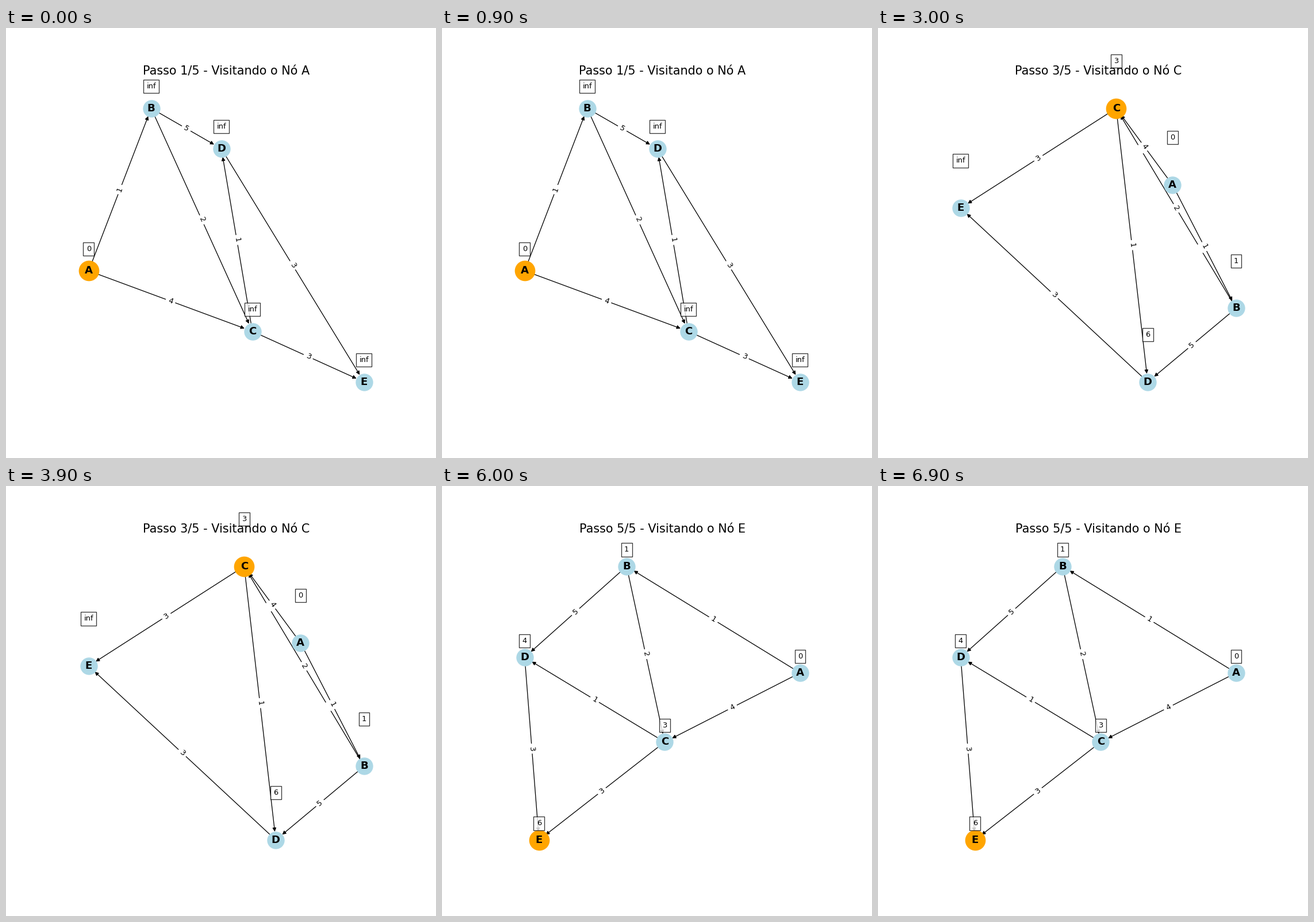
Recreate the animation shown at these times as a matplotlib script. Size 748x748 px, loop 7500 ms.

```python
import math

import matplotlib.pyplot as plt
from matplotlib.animation import FuncAnimation
from matplotlib.patches import FancyArrowPatch

NODE, ACTIVE = 500, 700
MARGIN = 0.105  # free space on each side, as a share of the drawing
LIFT = 0.1j     # a distance box sits this far above its node

NAMES = "ABCDE"
EDGES = [(a, b, int(w)) for a, b, w in "AB1 AC4 BC2 BD5 CD1 CE3 DE3".split()]

# Key points A to D of each step, x + yj; E balances them around the origin
LAYOUTS = [
    (-0.854 - 0.103j, -0.433 + 0.638j, 0.248 - 0.379j, 0.039 + 0.454j),
    (0.405 - 0.621j, 0.621 + 0.168j, -0.059 - 0.243j, 0.033 + 0.363j),
    (0.276 + 0.113j, 0.658 - 0.148j, -0.063 + 0.275j, 0.127 - 0.304j),
    (0.726 - 0.863j, -0.922 - 0.553j, 0.765 + 0.166j, -1.0 + 0.394j),
    (1.0 + 0.138j, -0.026 + 0.782j, 0.199 - 0.280j, -0.629 + 0.232j),
]


def dijkstra(start):
    """Return (visited node, distances at that moment) for each step."""
    dist = {n: math.inf for n in NAMES}
    dist[start] = 0
    left, steps = list(NAMES), []
    while left:
        node = min(left, key=dist.get)
        left.remove(node)
        steps.append((node, dict(dist)))
        for a, b, w in EDGES:
            if a == node:
                dist[b] = min(dist[b], dist[a] + w)
    return steps


STEPS = dijkstra("A")

plt.rcParams["font.family"] = "DejaVu Sans"
fig = plt.figure(figsize=(8, 8), dpi=93.5, facecolor="white")
ax = fig.add_subplot()


def padded(values):
    lo, hi = min(values), max(values)
    pad = MARGIN * (hi - lo)
    return lo - pad, hi + pad


def put_text(p, text, **style):
    ax.text(p.real, p.imag, str(text), ha="center", va="center", **style)


def draw_nodes(points, size, color):
    ax.scatter([p.real for p in points], [p.imag for p in points],
               s=size, c=color, zorder=2)


def draw_arrow(p, q):
    gap = math.sqrt(NODE) / 2
    ax.add_patch(FancyArrowPatch(
        (p.real, p.imag), (q.real, q.imag), arrowstyle="-|>", mutation_scale=10,
        color="black", lw=1, shrinkA=gap, shrinkB=gap, zorder=1))


def draw_weight(p, q, weight):
    (x0, y0), (x1, y1) = ax.transData.transform([(p.real, p.imag), (q.real, q.imag)])
    angle = math.degrees(math.atan2(y1 - y0, x1 - x0))
    upright = (angle + 90) % 180 - 90
    put_text((p + q) / 2, weight, size=10, rotation=upright, zorder=1,
             bbox=dict(boxstyle="round", ec="white", fc="white"))


def draw(step):
    current, dist = STEPS[step]
    points = [*LAYOUTS[step], -sum(LAYOUTS[step])]
    pos = dict(zip(NAMES, points))

    ax.clear()
    ax.axis("off")
    ax.set_xlim(padded([p.real for p in points]))
    ax.set_ylim(padded([p.imag for p in points]))

    for a, b, _ in EDGES:
        draw_arrow(pos[a], pos[b])
    for a, b, w in EDGES:
        draw_weight(pos[a], pos[b], w)

    draw_nodes(points, NODE, "lightblue")
    draw_nodes([pos[current]], ACTIVE, "orange")

    for name, p in pos.items():
        put_text(p, name, size=14, weight="bold")
        put_text(p + LIFT, dist[name], size=10, bbox=dict(facecolor="white", alpha=0.8))

    ax.set_title(f"Passo {step + 1}/{len(STEPS)} - Visitando o Nó {current}", fontsize=16)


anim = FuncAnimation(fig, draw, frames=len(STEPS), init_func=lambda: None,
                     interval=1500, repeat=True, repeat_delay=0)
plt.show()
```
